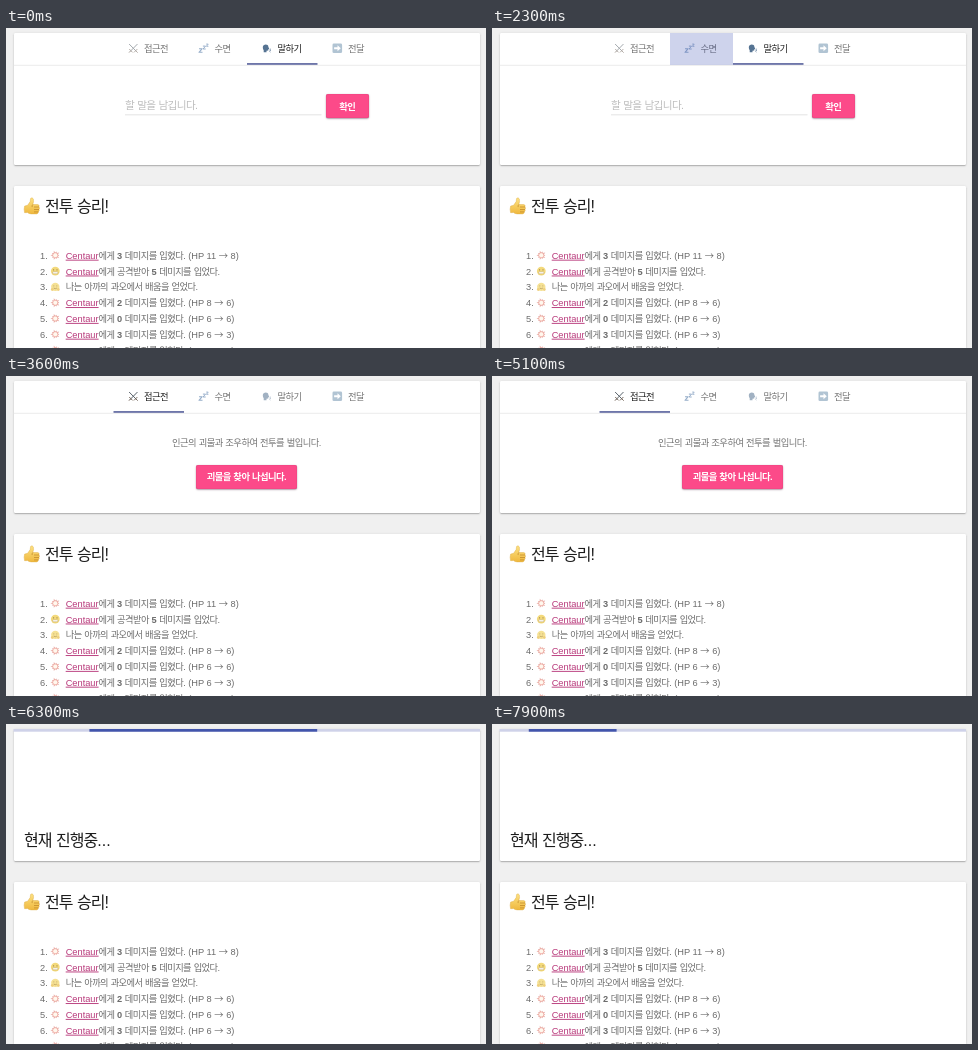
These frames come from a looping animation (480x320 px, 8 s). An HTML page:

```html
<!DOCTYPE html>
<html lang="ko">
<head>
<meta charset="utf-8">
<title>전투</title>
<style>
html, body { margin: 0; width: 100%; height: 100%; overflow: hidden; background: #f0f0f0; }
#stage { position: absolute; left: 0; top: 0; width: 480px; height: 320px; max-height: 100%; overflow: hidden; }
.paper {
  position: absolute;
  box-sizing: border-box;
  box-shadow: 0 1px 1.3px rgba(0,0,0,.15), 0 1.5px .7px -1px rgba(0,0,0,.14), 0 .5px 2.7px rgba(0,0,0,.13);
}
.card { left: 7.5px; width: 466.5px; background: #fff; border-radius: 1.3px; }
.button {
  height: 24px; background: #fc4a89; border-radius: 2px;
  box-shadow: inset 0 0 1px #b93a6c, 0 .7px 1.6px rgba(70,20,50,.5);
}
svg { position: absolute; left: 0; top: 0; display: block; overflow: hidden; }
text { font: 9.33px "Liberation Sans", "Noto Sans CJK KR", "Noto Sans CJK", sans-serif; fill: #757575; white-space: pre; }
.ko { letter-spacing: -.06em; }
.arrow { font-family: "Noto Sans CJK KR", "Noto Sans CJK", sans-serif; }
.head { font-size: 16px; fill: #1c1c1c; }
.list text { font-size: 9.25px; fill: #6c6c6c; }
.list .link { fill: #b8387a; text-decoration: underline; }
.bold, .cta { font-weight: 700; }
.cta { fill: #fff; }
.mid { text-anchor: middle; }
.hint { font-size: 10.67px; fill: #bdbdbd; }
.tab .icon { opacity: .55; }
.tab.on .icon { opacity: 1; }
.tab.on text { fill: #212121; font-weight: 500; }
</style>
</head>
<body>
<div id="stage">
<div class="paper card" style="top:5px;height:131.5px"></div>
<div class="paper card" style="top:157.5px;height:162.5px;border-radius:1.3px 1.3px 0 0"></div>
<div class="paper button" id="button"></div>
<svg width="480" height="320" viewBox="0 0 480 320">
  <defs>
    <linearGradient id="gold" x2="0" y2="1">
      <stop offset="0" stop-color="#fde283"/><stop offset="1" stop-color="#efb83e"/>
    </linearGradient>
    <clipPath id="tabClip"><rect id="clipBox" y="5" height="32"/></clipPath>
    <g id="swords" fill="none" stroke="#59636b" stroke-linecap="round">
      <path d="M-3.9-4 3 3M3.9-4-3 3"/>
      <path d="M1 3.8 3.8 1M-1 3.8-3.8 1M3 3 4.1 4.1M-3 3-4.1 4.1" stroke="#77695e"/>
    </g>
    <g id="sleep" fill="none" stroke="#426c9f" stroke-linejoin="round">
      <path d="M-4.8 .4H-1.6L-4.8 4H-1.3" stroke-width="1.1"/>
      <path d="M-.9-2.2H1.7L-.7 .7H1.9" stroke-width="1"/>
      <path d="M2.4-4.2H4.4L2.6-2H4.6" stroke-width=".9"/>
    </g>
    <g id="speak" fill="#557392">
      <path d="M-4-1C-4-4.6 1.6-4.8 1.6-1.4L2.5 .4 1.6 .9 1.4 2.3-.3 2.5V3.9H-3.1V2Q-4 .8-4-1Z"/>
      <path d="M2.9 1.2 4.2 .7M2.9 2.1 4.2 2.4M2.5 2.9 3.6 3.8" stroke="#557392" stroke-width=".7"/>
    </g>
    <g id="send">
      <rect x="-4.8" y="-4.8" width="9.6" height="9.6" rx="1.4" fill="#7394b0"/>
      <path d="M-3.2-1H.2V-3L3.5 0 .2 3V1H-3.2Z" fill="#fff"/>
    </g>
    <g id="burst" opacity=".75">
      <polygon id="star" fill="#d9776c"/>
      <use href="#star" transform="scale(.68)" style="filter:brightness(1.4)"/>
      <circle r="2" fill="#fff4e4"/>
    </g>
    <g id="grin">
      <circle r="4.4" fill="#f1d364"/>
      <path d="M-2.2-1.2h1M1.2-1.2h1" stroke="#7a5a22" stroke-width="1"/>
      <rect x="-2.7" y=".7" width="5.4" height="2" rx="1" fill="#fff" stroke="#9c7c3c" stroke-width=".4"/>
    </g>
    <g id="hug">
      <circle r="4.2" fill="#f4dc82"/>
      <path d="M-2-1h1M1-1h1M-1.6 1.2Q0 2.4 1.6 1.2" fill="none" stroke="#a08240" stroke-width=".7"/>
      <circle cx="-3" cy="2.6" r="1.4" fill="#ecc868"/><circle cx="3" cy="2.6" r="1.4" fill="#ecc868"/>
    </g>
  </defs>

  <g id="tabs">
    <path d="M7.5 37.3H474" stroke="#e3e3e3" stroke-width=".7"/>
    <g id="tabList"></g>
    <rect id="line" y="35.2" height="1.5" fill="#4b5594"/>
    <circle id="ripple" cy="21" fill="#3f51b5" clip-path="url(#tabClip)"/>
  </g>
  <g id="panels"></g>
  <g id="busy">
    <text class="head" x="18" y="121.5" data-say="현재 진행중..."/>
    <g id="progress">
      <rect x="7.5" y="5" width="466.5" height="2.7" fill="#cfd2e9"/>
      <rect id="bar" y="5" height="2.7" fill="#4255ac"/>
    </g>
  </g>

  <g transform="translate(18 169.5)" fill="url(#gold)" stroke="#d9a640" stroke-width=".4">
    <path d="M.6 8.6 3.6 7.8 6.2 4 6.6 .9Q8.2-.6 9.3 1.4 10 3.8 8.8 7H13.8Q15.8 7.4 15 9.4 16.2 10.4 15 11.9 15.7 13.2 14.4 14.3 14.5 16 12.6 16.4H7.2Q4.4 16.2 3.6 15L.6 15.2Q-.4 12 .6 8.6Z"/>
    <path d="M8.8 7Q7.6 8.4 8.2 9.6M10 9.5H15M10 12H15M10 14.4H14.4" fill="none" stroke="#bd8526" stroke-width=".7"/>
  </g>
  <text class="head" x="39" y="183.7" data-say="전투 승리!"/>
  <g class="list" id="log"></g>
</svg>
</div>
<script>
const $ = id => document.getElementById(id);
const LOOP = 8000, BUSY_AT = 5400, BAR_AT = 5700;
const CARD = { x: 7.5, w: 466.5 };

// Hangul gets tighter spacing; *x* is bold and _x_ is a link.
const rich = s => s
  .replace(/[가-힣]+/g, '<tspan class="ko">$&</tspan>')
  .replace(/→/g, '<tspan class="arrow">$&</tspan>')
  .replace(/\*(.+?)\*/g, '<tspan class="bold">$1</tspan>')
  .replace(/_(.+?)_/g, '<tspan class="link">$1</tspan>');
const say = (x, y, s, cls = '') => `<text x="${x}" y="${y}" class="${cls}">${rich(s)}</text>`;
const show = (el, on) => { el.style.display = on ? '' : 'none'; };
const clamp = v => Math.max(0, Math.min(1, v));
const easeOut = v => 1 - (1 - clamp(v)) ** 3;

const tabs = [
  { x: 107.5, w: 70.5, icon: 'swords', label: '접근전' },
  { x: 178, w: 63, icon: 'sleep', label: '수면' },
  { x: 241, w: 70.5, icon: 'speak', label: '말하기' },
  { x: 311.5, w: 62.5, icon: 'send', label: '전달' }
];
const panels = [
  { tab: 0, x: 190.3, y: 88.7, w: 100.8, cta: '괴물을 찾아 나섭니다.', text: '인근의 괴물과 조우하여 전투를 벌입니다.' },
  { tab: 1, x: 199.5, y: 88.7, w: 82.5, cta: '침대에 눕습니다.', text: '수면을 취하여 체력을 회복합니다.' },
  { tab: 2, x: 320, y: 66.3, w: 42.6, cta: '확인' }
];
const hit = (n, from, to) => `_Centaur_에게 *${n}* 데미지를 입혔다. (HP ${from} → ${to})`;
const log = [
  ['burst', hit(3, 11, 8)],
  ['grin', '_Centaur_에게 공격받아 *5* 데미지를 입었다.'],
  ['hug', '나는 아까의 과오에서 배움을 얻었다.'],
  ['burst', hit(2, 8, 6)],
  ['burst', hit(0, 6, 6)],
  ['burst', hit(3, 6, 3)],
  ['burst', hit(3, 3, 0)]
];
const presses = [
  { tab: 1, down: 2000, up: 2400 },
  { tab: 0, down: 3130, up: 3280 }
];

$('star').setAttribute('points', Array.from({ length: 20 }, (_, i) => {
  const r = i % 2 ? 2.7 : 4 + (i % 4) * .4, a = i * Math.PI / 10;
  return `${r * Math.cos(a)},${r * Math.sin(a)}`;
}).join(' '));
document.querySelectorAll('[data-say]').forEach(el => { el.innerHTML = rich(el.dataset.say); });
$('tabList').innerHTML = tabs.map(({ x, icon, label }) =>
  `<g class="tab"><use class="icon" href="#${icon}" x="${x + 19.8}" y="20.3"/>${say(x + 30.4, 23.9, label)}</g>`).join('');
$('panels').innerHTML = panels.map(p => '<g>' +
  (p.text ? say(240.7, 70.2, p.text, 'mid')
    : say(119, 80.6, '할 말을 남깁니다.', 'hint') + '<path d="M119 86.8H315.5" stroke="#dcdcdc" stroke-width=".8"/>') +
  say(p.x + p.w / 2, p.y + 15.2, p.cta, 'cta mid') + '</g>').join('');
$('log').innerHTML = log.map(([icon, s], i) => {
  const y = 230.7 + i * 15.8;
  return say(34, y, `${i + 1}.`) +
    `<use href="#${icon}" x="49.3" y="${y - 3.4}" opacity=".85"/>` + say(59.7, y, s);
}).join('');

const tabEls = [...$('tabList').children], panelEls = [...$('panels').children];

function set(el, attrs) {
  for (const k in attrs) el.setAttribute(k, attrs[k]);
}

function drawTabs(t) {
  const done = presses.filter(p => t >= p.up).pop();
  const active = done ? done.tab : 2;
  const { x, w } = tabs[active];
  tabEls.forEach((el, i) => el.classList.toggle('on', i === active));
  panelEls.forEach((el, i) => show(el, panels[i].tab === active));
  set($('line'), { x, width: w * (done ? easeOut((t - done.up) / 200) : 1) });

  const p = panels.find(q => q.tab === active);
  Object.assign($('button').style, { left: p.x + 'px', top: p.y + 'px', width: p.w + 'px' });

  const press = presses.find(q => t >= q.down && t < q.up + 320);
  show($('ripple'), press);
  if (press) {
    const b = tabs[press.tab];
    set($('clipBox'), { x: b.x, width: b.w });
    set($('ripple'), {
      cx: b.x + b.w / 2,
      r: 40 * easeOut((t - press.down) / 300),
      opacity: .25 * (1 - clamp((t - press.up) / 320))
    });
  }
}

function drawBar(t) {
  const p = ((t - BAR_AT + 50) / 2000) % 1;
  const left = p < .5 ? p / 2 : Math.min(1, .25 + (p - .5) * 3);
  const right = Math.min(1, p * 2);
  set($('bar'), { x: CARD.x + left * CARD.w, width: (right - left) * CARD.w });
}

function draw(t) {
  const busy = t >= BUSY_AT;
  for (const id of ['tabs', 'panels', 'button']) show($(id), !busy);
  show($('busy'), busy);
  show($('progress'), t >= BAR_AT);
  if (!busy) drawTabs(t);
  else if (t >= BAR_AT) drawBar(t);
}

const start = performance.now();
function tick() {
  draw((performance.now() - start) % LOOP);
  requestAnimationFrame(tick);
}
tick();
</script>
</body>
</html>
```
